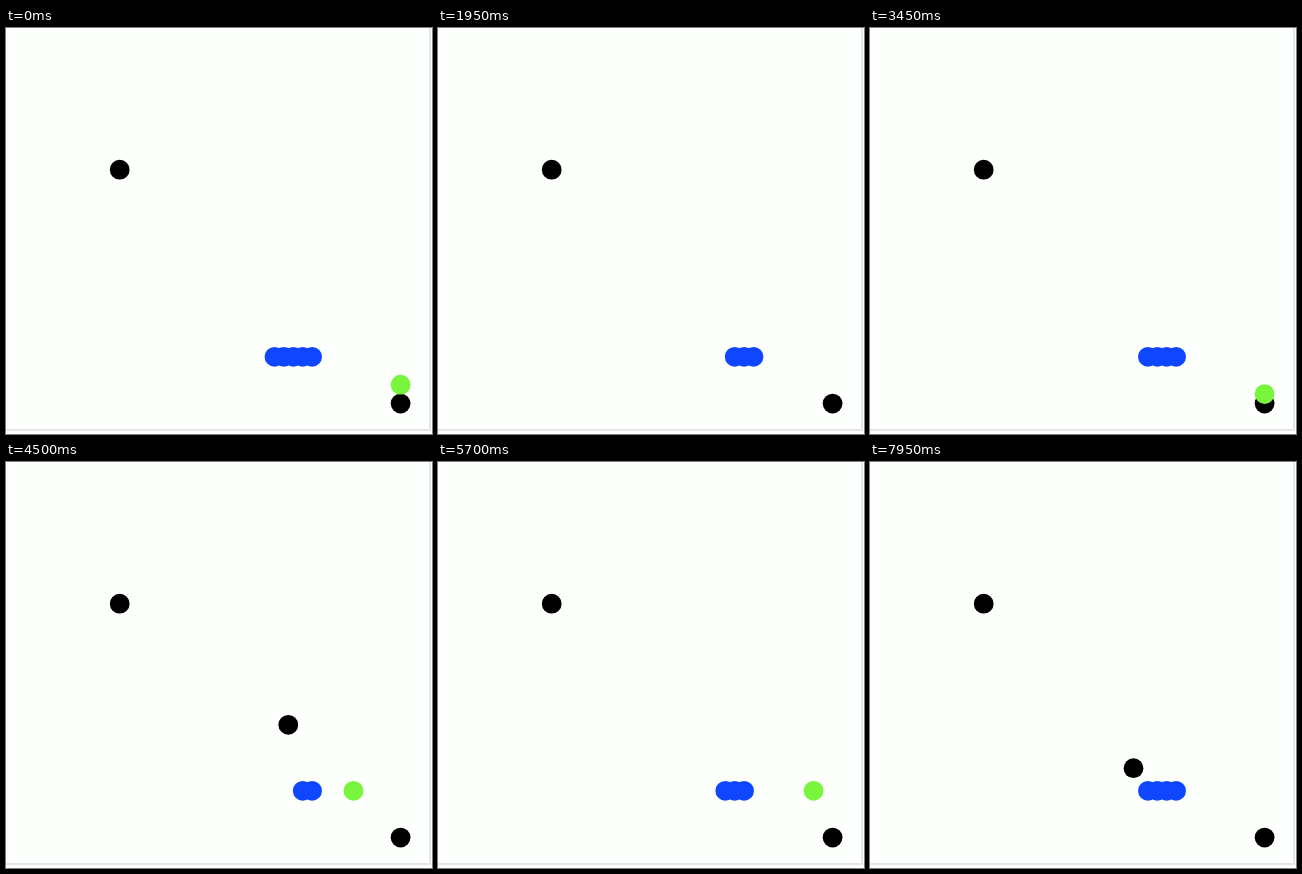
Write an HTML page with a canvas that moves like this. It is 426x406 px and loops after 8000 ms.

```html
<!DOCTYPE html>
<html>
<head>
<meta charset="utf-8">
<style>
html, body { margin: 0; width: 100%; height: 100%; overflow: hidden; background: #fdfffd; }
canvas { display: block; }
</style>
</head>
<body>
<canvas id="stage" width="426" height="406"></canvas>
<script>
const ctx = document.getElementById('stage').getContext('2d');
const LOOP = 8000, TICK = 150;
const SOURCE = { x: 113.7, y: 141.7 }, SINK = { x: 394.6, y: 375.6 };
const HEAD = 306.1, ROW = 328.8, GAP = 9.4, EXIT = HEAD + GAP;
const ARRIVE_SPEED = 97.6, LEAVE_SPEED = 126, JOIN = 345, START_QUEUE = 5;

// [tick, distance already walked at that tick]
const arrivals = [[4, 42.5], [14, 21.5], [16, 60], [18, 50], [28, 94.5],
                  [32, 42.5], [40, 74.5], [45, 53], [48, 70], [50, 21.5]];
const departures = [[0, 107], [3, 125.5], [7, 60], [9, 123], [13, 0], [23, 116.4],
                    [28, 107], [30, 32], [38, 60.1], [45, 32], [49, 79]];

const walked = (list, tick, speed) => list
  .filter(([start]) => tick >= start)
  .map(([start, d]) => d + (tick - start) * speed);

function dot(x, y, color) {
  ctx.fillStyle = color;
  ctx.beginPath();
  ctx.arc(x, y, 9.9, 0, 2 * Math.PI);
  ctx.fill();
}

function draw(tick) {
  ctx.fillStyle = '#fdfffd';
  ctx.fillRect(0, 0, 426, 406);
  ctx.fillStyle = '#e6e6e9';
  ctx.fillRect(423, 0, 2, 403);
  ctx.fillRect(0, 401, 425, 2);

  dot(SOURCE.x, SOURCE.y, '#000');
  dot(SINK.x, SINK.y, '#000');

  const coming = walked(arrivals, tick, ARRIVE_SPEED);
  const leaving = walked(departures, tick, LEAVE_SPEED);
  const joined = coming.filter(d => d >= JOIN).length;
  const queue = START_QUEUE + 1 + joined - leaving.length;

  for (let i = 0; i < queue; i++) dot(HEAD - i * GAP, ROW, '#0f46ff');

  // walk right to the end of the queue, then down to it
  const across = HEAD - queue * GAP - 5 - SOURCE.x;
  for (const d of coming) {
    if (d < JOIN) dot(SOURCE.x + Math.min(d, across), SOURCE.y + Math.max(0, d - across), '#000');
  }

  // walk right to the corner, then down to the sink
  const side = SINK.x - EXIT, total = side + SINK.y - ROW;
  for (const d of leaving) {
    if (d < total) dot(EXIT + Math.min(d, side), ROW + Math.max(0, d - side), d ? '#78f53c' : '#0f46ff');
  }
}

const begin = performance.now();
function frame() {
  draw(Math.floor((performance.now() - begin) % LOOP / TICK));
  requestAnimationFrame(frame);
}
frame();
</script>
</body>
</html>
```
